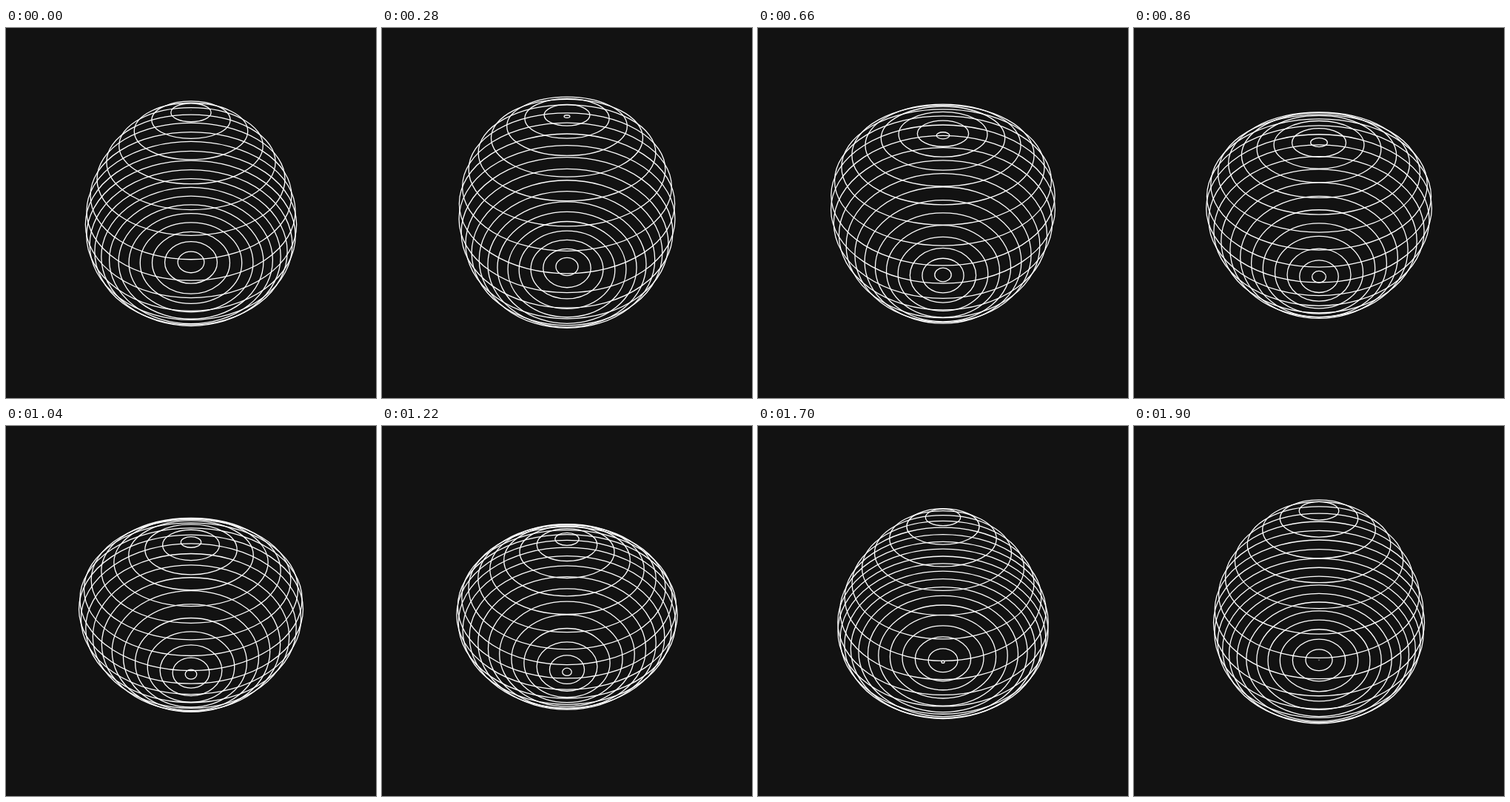
These frames come from a looping animation (500x500 px, 1920 ms). An HTML page with a canvas:

```html
<!DOCTYPE html>
<html lang="en">
<head>
<meta charset="utf-8">
<title>Rippling rings</title>
<style>
  html, body { margin: 0; width: 100%; height: 100%; overflow: hidden; background: #121212; }
  canvas { display: block; width: 500px; height: 500px; }
</style>
</head>
<body>
<canvas id="stage" width="500" height="500"></canvas>
<script>
const ctx = document.getElementById("stage").getContext("2d");
const LOOP = 1920, STEP = 20;
const RINGS = 21;
const WIDTH = 140, HEIGHT = 127; // half axes of the ball
const WAVE = 20;
const FOCAL = 433;
const TILT = 43.5 * Math.PI / 180;
const C = Math.cos(TILT), S = Math.sin(TILT);

// Screen height of a point at height y and distance z towards the viewer
function project(y, z) {
  return 250 - (y * C - z * S) / (1 - (y * S + z * C) / FOCAL);
}

// A level circle seen in perspective is an exact ellipse
function drawRing(r, y) {
  const front = project(y, r), back = project(y, -r);
  const depth = 1 - y * S / FOCAL;
  const rx = r / Math.sqrt(depth * depth - (r * C / FOCAL) ** 2);
  ctx.beginPath();
  ctx.ellipse(250, (front + back) / 2, rx, (front - back) / 2, 0, 0, 2 * Math.PI);
  ctx.stroke();
}

function draw(ms) {
  const p = Math.floor(ms % LOOP / STEP) * STEP / LOOP;
  ctx.fillStyle = "#121212";
  ctx.fillRect(0, 0, 500, 500);
  ctx.strokeStyle = "#fff";
  ctx.lineWidth = 1.3;
  for (let i = 0; i < RINGS; i++) {
    const a = Math.PI * (i + p) / RINGS;
    const r = Math.max(0.08, WIDTH * Math.sin(a));
    drawRing(r, HEIGHT * Math.cos(a) + WAVE * Math.cos(2 * Math.PI * p - 2 * a));
  }
}

const start = performance.now();
function tick() {
  draw(performance.now() - start);
  requestAnimationFrame(tick);
}
tick();
</script>
</body>
</html>
```
